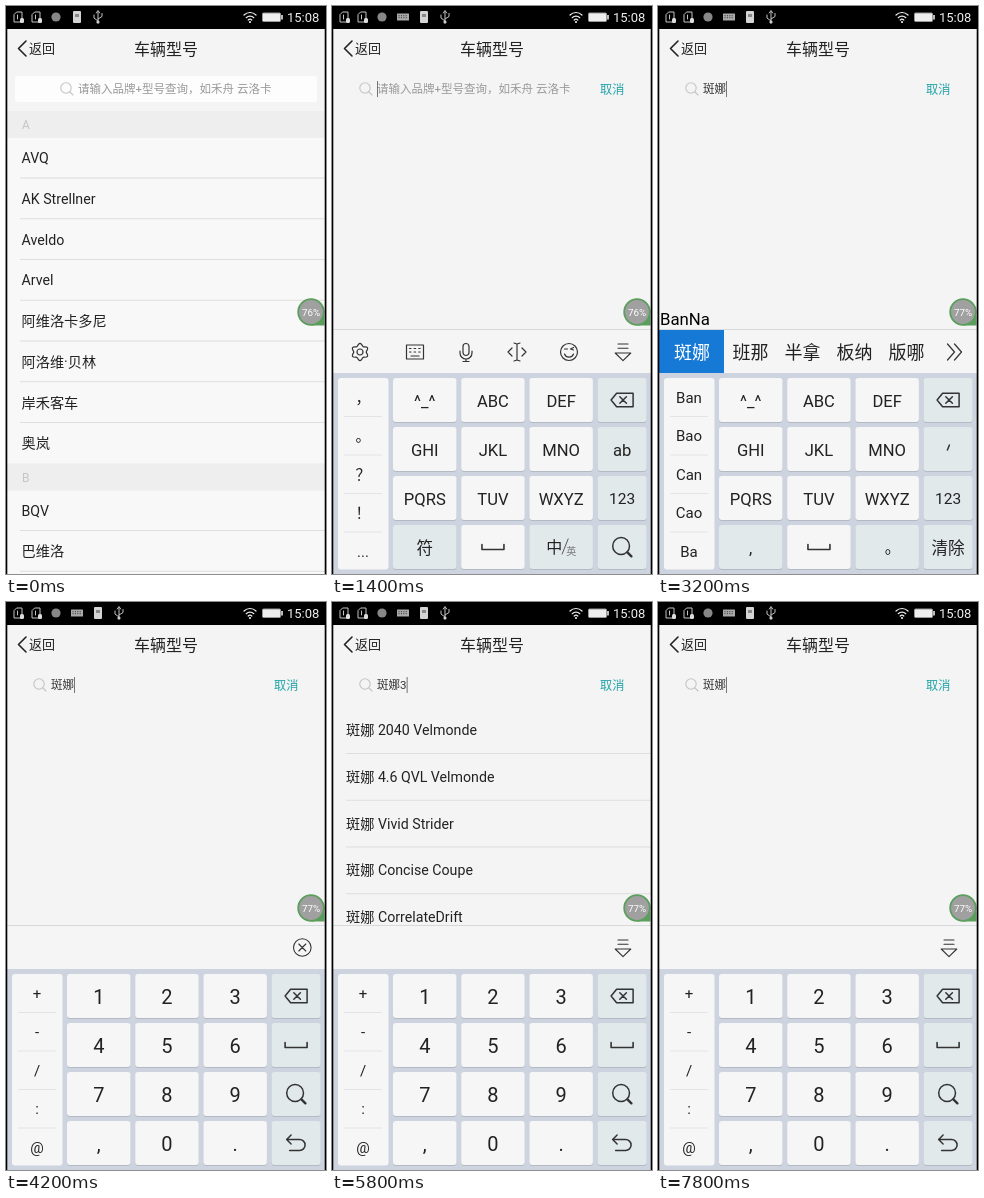
Recreate the animation shown at these times as an HTML page. Size 320x568 px, loop 8 s.

```html
<!DOCTYPE html>
<html lang="zh-CN">
<head>
<meta charset="utf-8">
<title>车辆型号</title>
<style>
  html, body { margin: 0; width: 100%; height: 100%; overflow: hidden; background: #f4f4f4; }
  svg { display: block; width: 320px; height: 568px; }
  text { font-family: Roboto, "Noto Sans CJK SC", "Noto Sans CJK", sans-serif; white-space: pre; }
  .ico { fill: none; stroke: #333; stroke-width: 1.2; stroke-linecap: round; stroke-linejoin: round; }
</style>
</head>
<body>
<svg id="stage" viewBox="0 0 320 568"></svg>
<script>
const LOOP = 8000;
const INK = '#222', TEAL = '#22a3a8', BLUE = '#1679d6';
const BRAND = '斑娜';
const HINT = '请输入品牌+型号查询，如禾舟 云洛卡';

const text = (x, y, s, size, fill = INK, anchor = 'start') =>
  `<text x="${x}" y="${y}" font-size="${size}" fill="${fill}" text-anchor="${anchor}">${s}</text>`;
const mid = (x, y, s, size, fill) => text(x, y, s, size, fill, 'middle');
const box = (x, y, w, h, fill, r = 0, more = '') =>
  `<rect x="${x}" y="${y}" width="${w}" height="${h}" rx="${r}" fill="${fill}" ${more}/>`;
const line = (d, style = '') => `<path class="ico" d="${d}" style="${style}"/>`;
const ring = (x, y, r, style = '') => `<circle class="ico" cx="${x}" cy="${y}" r="${r}" style="${style}"/>`;
const at = (x, y, s) => `<g transform="translate(${x} ${y})">${s}</g>`;

// Icons are drawn around their own centre.
const gear = () => {
  let d = '';
  for (let i = 0; i < 48; i++) {
    const a = i / 48 * Math.PI * 2, r = 7.4 + Math.cos(a * 6) * 1.2;
    d += `${i ? 'L' : 'M'}${(r * Math.sin(a)).toFixed(2)} ${(r * Math.cos(a)).toFixed(2)}`;
  }
  return line(d + 'Z') + ring(0, 0, 3);
};
const icons = {
  gear: gear(),
  board: line('M-8.5 -7h17v14h-17zM-4 4h8') +
    line('M-5.5 -3.5h11M-5.5 0h11', 'stroke-dasharray:1.5 3.1'),
  mic: line('M-3 -5.5a3 3 0 0 1 6 0v6a3 3 0 0 1 -6 0zM-6 -1v2a6 6 0 0 0 12 0v-2M0 7v2.5M-3 9.5h6'),
  caret: line('M0 -8v16M-3 -9l3 1 3 -1M-3 9l3 -1 3 1M-5 -4l-4 4 4 4M5 -4l4 4 -4 4'),
  smile: ring(0, 0, 8.5) + line('M-4.5 2a4.8 4.8 0 0 0 9 0M-4.5 -3h3M4.5 -4.5l-3 1.5 3 1'),
  hide: line('M-5 -8H5M-5 -3.8H5M-7.8 1H7.8L0 8.6z', 'stroke-width:1.1'),
  close: ring(5.3, -.5, 8.8, 'stroke-width:1.1') +
    line('M1.8 -4l7 7M8.8 -4l-7 7', 'stroke-width:1.1'),
  more: line('M-7 -8l7 8 -7 8M0 -8l7 8 -7 8'),
  del: line('M-11 0l5.5 -6.8h16.5v13.6h-16.5zM-2.3 -3.3l6.6 6.6M4.3 -3.3l-6.6 6.6', 'stroke-width:1.5'),
  space: line('M-11 -2.5v5h22v-5', 'stroke-width:1.6'),
  find: ring(-1, -1, 8.4, 'stroke-width:1.5') + line('M5.3 5.3l4 4', 'stroke-width:2.4'),
  enter: line('M-5 -8l-4.5 4.5 4.5 4.5M-9.5 -3.5h13a5.5 5.5 0 0 1 0 11h-10', 'stroke-width:1.5'),
  tick: line('M1.3 -4l-2 5', 'stroke-width:1.5'),
  lang: text(-15, 6, '中', 16) + line('M1 7l6 -15', 'stroke-width:.8') + text(5, 8, '英', 10, '#777'),
  stop: text(-2.5, 6, '。', 16)
};

const pads = {
  t9: {
    side: ['，', '。', '？', '！', '...'],
    keys: ['^_^', 'ABC', 'DEF', '@del', 'GHI', 'JKL', 'MNO', 'ab',
      'PQRS', 'TUV', 'WXYZ', '123', '符', '@space', '@lang', '@find'],
    tinted: [3, 7, 11, 12, 14, 15], size: 16.6
  },
  pinyin: {
    keys: ['^_^', 'ABC', 'DEF', '@del', 'GHI', 'JKL', 'MNO', '@tick',
      'PQRS', 'TUV', 'WXYZ', '123', ',', '@space', '@stop', '清除'],
    tinted: [3, 7, 11, 12, 14, 15], size: 16.6
  },
  num: {
    side: ['+', '-', '/', ':', '@'],
    keys: ['1', '2', '3', '@del', '4', '5', '6', '@space',
      '7', '8', '9', '@find', ',', '0', '.', '@enter'],
    tinted: [3, 7, 11, 15], size: 20
  }
};

const syllables = ['Ban', 'Bao', 'Can', 'Cao', 'Ba'];
const phrases = [BRAND, '班那', '半拿', '板纳', '版哪'];
const guesses = {
  A: { side: ['A', 'B', 'C'], list: [...'啊不才比长从'] },
  Ba: { side: ['Ba', 'Ca', 'A', 'B', 'C'], list: [...'把爸吧擦八巴'] },
  Ban: { side: syllables, list: [...'班办宝包半版'] },
  BanN: { side: syllables, list: phrases },
  BanNa: { side: syllables, list: phrases }
};

// Each entry changes part of the screen state from its time on.
const steps = [
  [0, { page: 'list', pad: '', bar: 'tools', hit: '', query: '', typed: '', results: false, pick: false, level: 76 }],
  [800, { page: 'search' }],
  [1000, { pad: 't9' }],
  [1600, { pad: 'pinyin', bar: 'guess', typed: 'A', hit: 'ABC' }],
  [1800, { hit: '' }],
  [2000, { typed: 'Ba', hit: 'ABC' }],
  [2200, { typed: 'Ban', hit: 'MNO' }],
  [2400, { hit: '' }],
  [2600, { typed: 'BanN', hit: 'MNO' }],
  [2800, { typed: 'BanNa', hit: 'ABC', level: 77 }],
  [3000, { hit: '' }],
  [3200, { pick: true, query: BRAND }],
  [3400, { pick: false, typed: '', pad: 't9', bar: 'close' }],
  [4000, { hit: '123' }],
  [4200, { hit: '', pad: 'num' }],
  [4400, { results: true }],
  [5400, { hit: '3' }],
  [5600, { hit: '', query: BRAND + '3', bar: 'hide' }],
  [6200, { results: false }],
  [7200, { hit: '@del' }],
  [7400, { hit: '', query: BRAND }]
];

function statusBar(searching) {
  const pale = 'stroke:#c4c4c4;stroke-width:1';
  const sim = line('M-2 -5h5v10h-8v-7z', pale) + line('M-1.5 -2v4', pale) + box(1, 1, 4, 5, '#ddd', 1.5);
  const card = box(-4, -6, 8, 12, '#d4d4d4', 1) + box(-2, -3, 4, 3, '#888');
  const usb = line('M0 6v-11M-1.7 -4l1.7 -2.5 1.7 2.5M0 4l-4 -3v-3M0 2l4 -2.5v-3', pale) +
    '<circle cy="5" r="1.6" fill="#ccc"/>';
  const keys = box(-6, -3.5, 12, 7, '#aaa', .5) +
    line('M-4.5 -1.3h9M-4.5 .7h9', 'stroke:#222;stroke-width:.9;stroke-dasharray:1 1.4;stroke-linecap:butt');
  const row = [sim, sim, '<circle r="4.6" fill="#888"/>', ...(searching ? [keys] : []), card, usb];
  const spots = [13, 31, 50, 71, 92, 113];
  const arcs = line('M-6 -2a8.5 8.5 0 0 1 12 0M-3.8 .7a5.4 5.4 0 0 1 7.6 0M-1.8 3a2.6 2.6 0 0 1 3.6 0',
    'stroke:#eee;stroke-width:1.2') + '<circle cy="5" r="1.1" fill="#eee"/>';
  return box(0, 0, 320, 23, '#000') + row.map((s, i) => at(spots[i], 11, s)).join('') + at(244, 11, arcs) +
    box(256.5, 7, 18, 8.5, '#eee', 1, 'stroke="#999"') + box(275, 9, 2, 4.5, '#bbb') +
    text(281, 16, '15:08', 13, '#eee');
}

const header = () =>
  line('M20 35l-7.5 7.5 7.5 7.5', 'stroke:#222;stroke-width:1.6') +
  text(23, 47, '返回', 13) + mid(160, 49, '车辆型号', 16);

const paleLens = ring(-1, -1, 5.2, 'stroke:#c4c4c4;stroke-width:1.1') +
  line('M3 3l3 3', 'stroke:#c4c4c4;stroke-width:1.1');

function brandList() {
  const first = ['AVQ', 'AK Strellner', 'Aveldo', 'Arvel', '阿维洛卡多尼', '阿洛维·贝林', '岸禾客车', '奥岚'];
  const second = ['BQV', '巴维洛'];
  const group = (top, letter, names) => box(1, top, 318, 27, '#eee') + text(16, top + 18, letter, 12, '#c6c6c6') +
    names.map((n, i) => text(15.5, top + 52 + i * 40.75, n, 14.2) +
      (i < names.length - 1 || letter === 'B' ? box(14, top + 66.5 + i * 40.75, 305, 1, '#dedede') : '')).join('');
  return box(1, 105, 318, 463, '#f8f8f8') + box(9, 70, 302, 26, '#fdfdfd', 3) +
    at(61, 83, paleLens) + text(72, 87.3, HINT, 11.5, '#999') +
    group(105, 'A', first) + group(457.5, 'B', second);
}

function searchPage(s) {
  const end = 45 + (s.query ? 23 : 0) + (s.query.length > 2 ? 6.7 : 0);
  const models = ['2040 Velmonde', '4.6 QVL Velmonde', 'Vivid Strider', 'Concise Coupe', 'CorrelateDrift'];
  return at(34, 83, paleLens) +
    text(45, 87.3, s.query || HINT, 11.5, s.query ? '#333' : '#999') +
    box(end, 75, .8, 16, '#555') + text(268, 87.5, '取消', 12.2, TEAL) +
    (s.results ? models.map((m, i) => text(14, 133 + i * 46.75, `${BRAND} ${m}`, 14.2) +
      box(14, 151 + i * 46.75, 305, 1, '#dedede')).join('') : '');
}

function toolBar(s) {
  let out = box(1, 323, 318, 44, '#f5f5f5') + box(1, 323, 318, 1, '#d6d9dc');
  if (s.bar === 'tools') {
    ['gear', 'board', 'mic', 'caret', 'smile', 'hide'].forEach((n, i) => {
      out += at([28, 83, 134, 185, 237, 291][i], 346, icons[n]);
    });
  } else if (s.bar === 'guess') {
    const { list } = guesses[s.typed], words = list === phrases;
    if (s.pick) out += box(1, 324, 65, 43, BLUE);
    list.forEach((w, i) => {
      const x = words ? (i ? 40.5 + i * 52 : 34) : 24.5 + i * 45.4;
      out += mid(x, 352.5, w, 18, i ? INK : s.pick ? '#fff' : '#2a86c8');
    });
    out += at(296.5, 346, icons.more);
  } else {
    out += at(291, 346, icons[s.bar]);
  }
  return out;
}

function keyboard(s) {
  const pad = pads[s.pad], side = pad.side || guesses[s.typed].side;
  let out = box(1, 367, 318, 201, '#cdd4e0') + box(6, 372, 50.5, 191.5, '#f6f6f6', 3);
  side.forEach((c, i) => {
    out += mid(31, 396.8 + i * 38.5, c, 15) + (i < 4 ? box(12, 410 + i * 38.5, 38, 1, '#e1e5e8') : '');
  });
  pad.keys.forEach((k, i) => {
    const col = i % 4, x = 61 + col * 68.2, y = 372 + (i >> 2) * 49, w = col < 3 ? 63.5 : 49;
    const hit = k === s.hit, cx = x + w / 2, cy = y + 22;
    const fill = hit ? BLUE : pad.tinted.includes(i) ? '#e2e9ea' : '#f6f6f6';
    const size = k === '123' ? 15.5 : pad.size;
    out += box(x, y + 1, w, 44, '#b4bac4', 3) + box(x, y, w, 44, fill, 3);
    out += k[0] === '@' ? at(cx, cy, icons[k.slice(1)])
      : mid(cx, cy + size * .36 + .9, k, size, hit ? '#fff' : INK);
  });
  return out;
}

const bubble = level =>
  '<path d="M305 319.5h13.5v-10z" fill="#5b9e5d"/>' +
  '<circle cx="305" cy="306" r="12.8" fill="#a0a0a0" stroke="#5b9e5d" stroke-width="1.8"/>' +
  mid(305, 309.6, level + '%', 9.8, '#fff');

function draw(s) {
  const searching = s.page === 'search';
  return box(0, 0, 320, 568, '#f4f4f4') + header() +
    (searching ? searchPage(s) : brandList()) +
    (s.typed ? text(2, 319, s.typed, 16.8, '#000') : '') +
    (s.pad ? toolBar(s) + keyboard(s) : '') + bubble(s.level) +
    box(0, 22, 1.3, 546, '#000') + box(318.7, 22, 1.3, 546, '#000') + statusBar(searching);
}

const stage = document.getElementById('stage');
let shown = -1;
function tick() {
  const t = performance.now() % LOOP;
  const past = steps.filter(([start]) => start <= t);
  if (past.length !== shown) {
    shown = past.length;
    stage.innerHTML = draw(Object.assign({}, ...past.map(([, change]) => change)));
  }
  requestAnimationFrame(tick);
}
tick();
</script>
</body>
</html>
```
